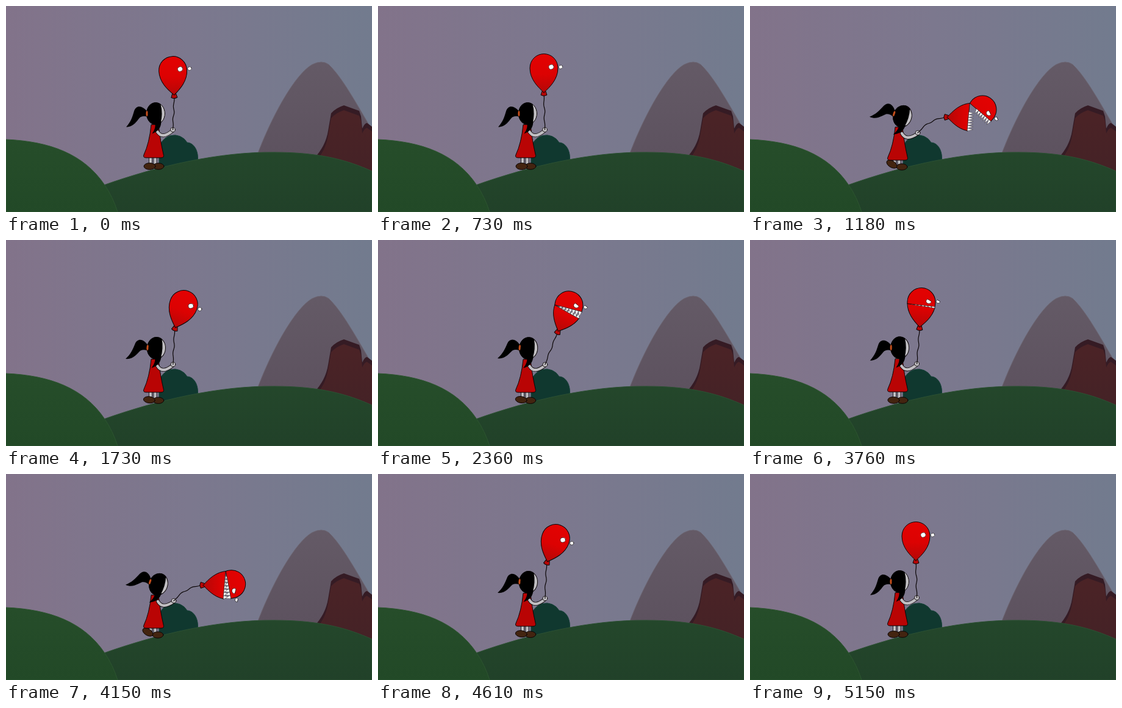
An HTML page with a canvas that plays this animation: 600x338 px, repeating every 5.21 s.

```html
<!DOCTYPE html>
<html lang="en">
<head>
<meta charset="utf-8">
<title>Girl with a biting balloon</title>
<style>
html, body { margin: 0; width: 100%; height: 100%; overflow: hidden; background: #7b778d; }
canvas { display: block; }
</style>
</head>
<body>
<canvas id="stage" width="600" height="338"></canvas>
<script>
const ctx = document.getElementById('stage').getContext('2d');
const LOOP = 5210, BITES = [850, 2240, 3730], RAD = Math.PI / 180;
const INK = '#0a0506', SKIN = '#c1bfc3';

const clamp = v => Math.min(1, Math.max(0, v));

// Lunge strength 0..1: out in 330 ms, held, then back to rest
function lunge(dt, outPower, backPower) {
  return dt < 450 ? clamp(dt / 330) ** outPower : clamp((1180 - dt) / 730) ** backPower;
}

function poseAt(t) {
  const start = BITES.filter(b => b <= t).pop();
  const dt = start === undefined ? 0 : t - start;
  const settle = clamp(1 - t / 550);
  const lean = lunge(dt, 1.3, 1.7), swing = lunge(dt, 1, 3);
  const hand = [273.5 + 1.5 * lean, 203 + 5 * lean];
  const angle = (62 * swing - 1.5 + 4 * settle) * RAD;
  const length = 58 - 6 * swing - 4 * settle;
  return {
    lean, hand,
    tilt: 90 * lean - 3 * settle,
    open: 56 * clamp(dt / 340) ** 1.3 * clamp((440 - dt) / 70),
    knot: [hand[0] + length * Math.sin(angle), hand[1] - length * Math.cos(angle)]
  };
}

const shapes = {
  mountain: new Path2D('M412 244C437 178 474 112 502 96Q518 88 529 96C552 118 574 160 600 203V270H412Z'),
  rock: new Path2D('M505 250Q524 230 528 205L533 176Q541 167 554 163L579 172L582 181L584 201Q588 192 592 192L600 198V290H505Z'),
  bush: new Path2D('M251 275V235A25 26 0 0 1 297 224A17.5 25 0 0 1 314.500 249V275Z'),
  hill: new Path2D('M160 294C250 262 350 239 440 240C515 240 560 253 600 271V338H160Z'),
  nearHill: new Path2D('M0 219C72 222 128 243 162 294Q175 313 183 338H0Z'),
  balloon: new Path2D('M0 -3C-10 -12 -23 -25 -23 -43C-23 -57 -12 -66.500 0 -66.500C12 -66.500 23 -57 23 -43C23 -25 10 -12 0 -3Z'),
  knot: new Path2D('M-3 -5L-5 1Q0 4 5 1L3 -5Z'),
  lowerHalf: new Path2D('M-40 -41L40 -35V10H-40Z'),
  upperHalf: new Path2D('M-40 -41L40 -35V-80H-40Z'),
  lip: new Path2D('M-23 -40L23 -36'),
  dress: new Path2D('M238 195Q235 225 226 244Q224 249 230 249H254Q260 249 258 243Q253 222 250 195Z'),
  hair: new Path2D('M8 -15.500A15.300 18.300 0 1 0 8 15.500Q12 0 8 -15.500Z'),
  lock: new Path2D('M-3 11C1 19 -1 26 -6 33C5 29 9 22 9 12Z'),
  tail: new Path2D('M0 -4C-8 -14 -18 -14 -21 -4C-24 6 -26 13 -34 22C-21 22 -16 11 -11 6Q-6 3 0 5Z')
};

function paint(path, fill, line, width = 1) {
  if (fill) { ctx.fillStyle = fill; ctx.fill(path); }
  if (line) { ctx.strokeStyle = line; ctx.lineWidth = width; ctx.stroke(path); }
}

function oval(x, y, rx, ry, rot = 0, from = 0, to = 2 * Math.PI) {
  const p = new Path2D();
  p.ellipse(x, y, rx, ry, rot, from, to);
  p.closePath();
  return p;
}

// Runs a drawing in a moved and turned frame
function within(x, y, angle, draw) {
  ctx.save();
  ctx.translate(x, y);
  ctx.rotate(angle);
  draw();
  ctx.restore();
}

function gradient(x0, y0, x1, y1, ...colors) {
  const g = ctx.createLinearGradient(x0, y0, x1, y1);
  colors.forEach((c, i) => g.addColorStop(i / (colors.length - 1), c));
  return g;
}

function drawScene() {
  ctx.fillStyle = gradient(0, 0, 600, 0, '#82738a', '#7c788e', '#727b8e');
  ctx.fillRect(0, 0, 600, 338);
  paint(shapes.mountain, gradient(0, 92, 0, 245, '#645a66', '#5d525f'), '#6b6470');
  paint(shapes.rock, '#351b24');
  within(0, 8, 0, () => paint(shapes.rock, gradient(0, 165, 0, 270, '#4b2326', '#442226')));
  paint(shapes.bush, '#10382f', '#17423a');
  paint(shapes.hill, gradient(0, 240, 0, 338, '#24472b', '#214129'), '#2c5133');
  paint(shapes.nearHill, gradient(0, 219, 0, 338, '#264d2a', '#224927'), '#2d5530');
}

function drawHead() {
  paint(oval(0, 0, 15, 18), SKIN, INK);
  paint(shapes.hair, '#000');
  paint(shapes.lock, '#000');
}

function drawGirl({ lean, hand }) {
  ctx.lineCap = 'round';
  for (const x of [237, 244.5]) {
    const leg = new Path2D(`M${x} 246V259`);
    paint(leg, null, INK, 5.8);
    paint(leg, null, SKIN, 4.2);
  }
  paint(oval(250 - lean, 263 + lean, 9, 5.2), '#432410', INK);
  paint(oval(235.5 - 3 * lean, 263 - 3.5 * lean, 9.5, 5.4, .55 * lean), '#432410', INK);
  within(0, 4 * lean, 0, () => paint(shapes.dress, '#b90404', INK));

  const arm = new Path2D(`M${248 + lean} ${206 + 3 * lean}Q256 ${219 + 3 * lean} ${hand[0] - 1} ${hand[1] + 2}`);
  paint(arm, null, INK, 6);
  paint(arm, null, SKIN, 4.4);

  within(245.5 + 4.5 * lean, 176.5 + 4.5 * lean, .3 * lean, () => {
    within(-14.5, 0, .15 * lean, () => paint(shapes.tail, '#000'));
    drawHead();
    paint(oval(-14.5, 0, 1.9, 4.8), '#c9501b', INK, .6);
  });
  paint(oval(...hand, 3.9, 3.7), SKIN, INK, .8);
}

function drawString({ hand, knot, lean }) {
  const dx = knot[0] - hand[0], dy = knot[1] - hand[1], len = Math.hypot(dx, dy);
  const line = new Path2D();
  for (let u = 0; u <= 1; u += 1 / 32) {
    const off = Math.sin(Math.PI * u) * (Math.sin(u * 15) - 5 * lean * lean);
    line.lineTo(hand[0] + dx * u - dy / len * off, hand[1] + dy * u + dx / len * off);
  }
  paint(line, null, INK, 1.2);
}

function drawTeeth(open, side) {
  const count = 7, from = .12 + .2 * open / 56, step = (.99 - from) / count;
  for (let i = 0; i < count; i++) {
    const u = from + i * step, x = -23 + 46 * u, y = -40 + 4 * u, w = 46 * step;
    const gap = 46 * (u + step / 2) * Math.sin(open * RAD);
    const len = Math.min(7 + 2 * u, gap * .95);
    const tooth = new Path2D(`M${x} ${y}l${w / 2} ${side * len}L${x + w} ${y + 4 * step}Z`);
    paint(tooth, '#fff', open > 5 && '#40383a', .5);
  }
}

function drawSkin() {
  paint(shapes.balloon, gradient(0, -66, 0, 0, '#e30202', '#dc0202', '#b00808'), INK);
}

function drawHalf(region) {
  ctx.save();
  ctx.clip(region);
  drawSkin();
  ctx.restore();
  paint(shapes.lip, null, INK, .8);
}

function drawEyes(angry) {
  const arc = angry ? [0, .1, Math.PI + 1] : [-.5];
  paint(oval(12, -45, 4.3, 3.9, ...arc), '#fff', INK, .6);
  paint(oval(27.5, -45, 3.2, 2.9, ...arc), '#fff', INK, .6);
}

function drawBalloon({ knot, tilt, open }) {
  within(...knot, tilt * RAD, () => {
    paint(shapes.knot, '#b80606', INK);
    if (open < .3) {
      drawSkin();
      drawEyes(false);
      return;
    }
    drawHalf(shapes.lowerHalf);
    drawTeeth(open, -1);
    // The upper jaw swings around the back corner of the mouth
    within(-23, -40, -open * RAD, () => {
      ctx.translate(23, 40);
      drawHalf(shapes.upperHalf);
      drawTeeth(open, 1);
      drawEyes(true);
    });
  });
}

function frame(now) {
  const pose = poseAt(now % LOOP);
  drawScene();
  drawGirl(pose);
  drawString(pose);
  drawBalloon(pose);
  requestAnimationFrame(frame);
}
requestAnimationFrame(frame);
</script>
</body>
</html>
```
